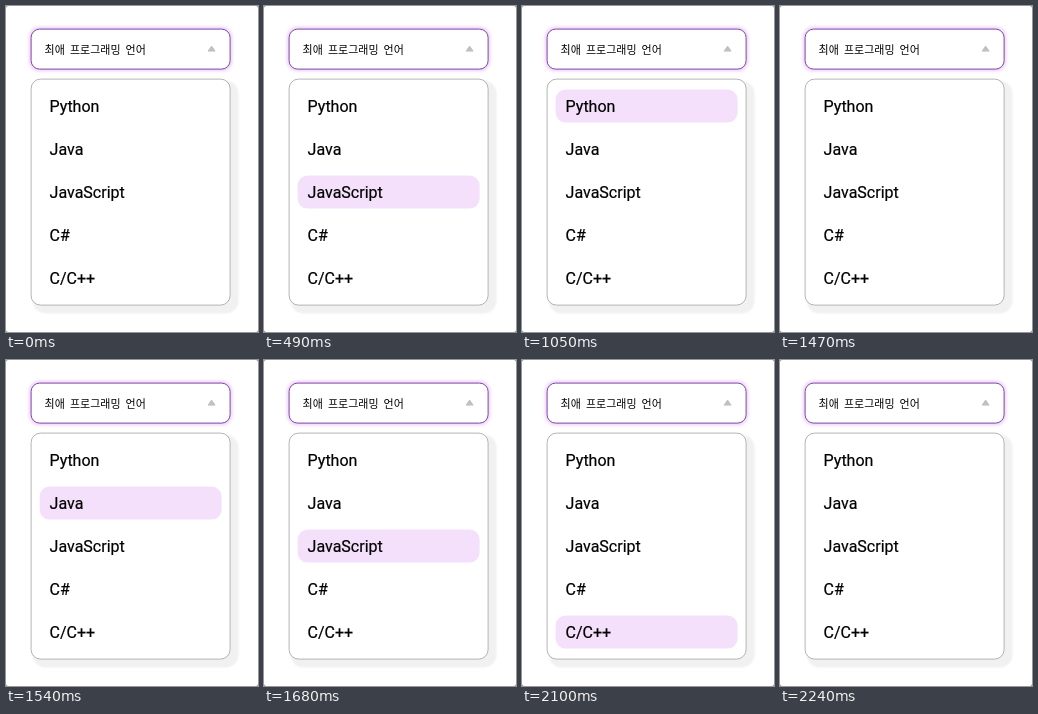
Recreate the animation shown at these times as an HTML page. Size 252x326 px, loop 2660 ms.

```html
<!DOCTYPE html>
<html lang="ko">
<head>
<meta charset="utf-8">
<style>
  html, body { margin: 0; width: 100%; height: 100%; overflow: hidden; }
  html { background: #777; }
  body { background: #fff; border-radius: 2px; color: #000; }
  main { position: absolute; transform: translate(-.4px, -.4px); }
  .select, .list {
    position: absolute; left: 25px; width: 200px;
    box-sizing: border-box; background: #fff;
  }
  .select {
    top: 23px; height: 41px; padding-left: 13px;
    border: 1px solid #8044a8; border-radius: 9px; box-shadow: 0 0 3px 2px #f0d8f8;
    font: 500 11px/38px "Noto Sans CJK KR", "Noto Sans CJK", sans-serif;
    word-spacing: 2px; white-space: nowrap;
  }
  .select svg { position: absolute; left: 175px; top: 15px; }
  .list {
    top: 73px; height: 227px; margin: 0; padding: 10px 8px; list-style: none;
    border: 1px solid #b4b4b4; border-radius: 10px;
    box-shadow: 5px 5px 2px 3px #f1f1f1;
    font: 16px/33px Roboto, sans-serif; -webkit-text-stroke: .2px;
  }
  li { height: 33px; margin-bottom: 10px; padding-left: 10px; border-radius: 10px; }
  li.on { background: #f5e0fb; }
</style>
</head>
<body>
<main>
  <div class="select">최애 프로그래밍 언어
    <svg width="10" height="8"><path d="M5 1.5 8.5 6.5h-7z" fill="#c0c0c0" stroke="#c0c0c0" stroke-linejoin="round"/></svg>
  </div>
  <ul class="list">
    <li>Python</li>
    <li>Java</li>
    <li>JavaScript</li>
    <li>C#</li>
    <li>C/C++</li>
  </ul>
</main>
<script>
  const LOOP = 2660;
  // [start ms, hovered row]; -1 means the pointer is on no row
  const hovers = [
    [0, -1], [490, 2], [560, 1], [630, -1], [1050, 0], [1470, -1],
    [1540, 1], [1610, -1], [1680, 2], [1960, 3], [2100, 4], [2240, -1]
  ];
  const rows = document.querySelectorAll('li');
  const start = performance.now();

  function draw(now) {
    const t = Math.max(0, now - start) % LOOP;
    const row = hovers.findLast(([ms]) => ms <= t)[1];
    rows.forEach((li, i) => li.classList.toggle('on', i === row));
    requestAnimationFrame(draw);
  }
  draw(start);
</script>
</body>
</html>
```
